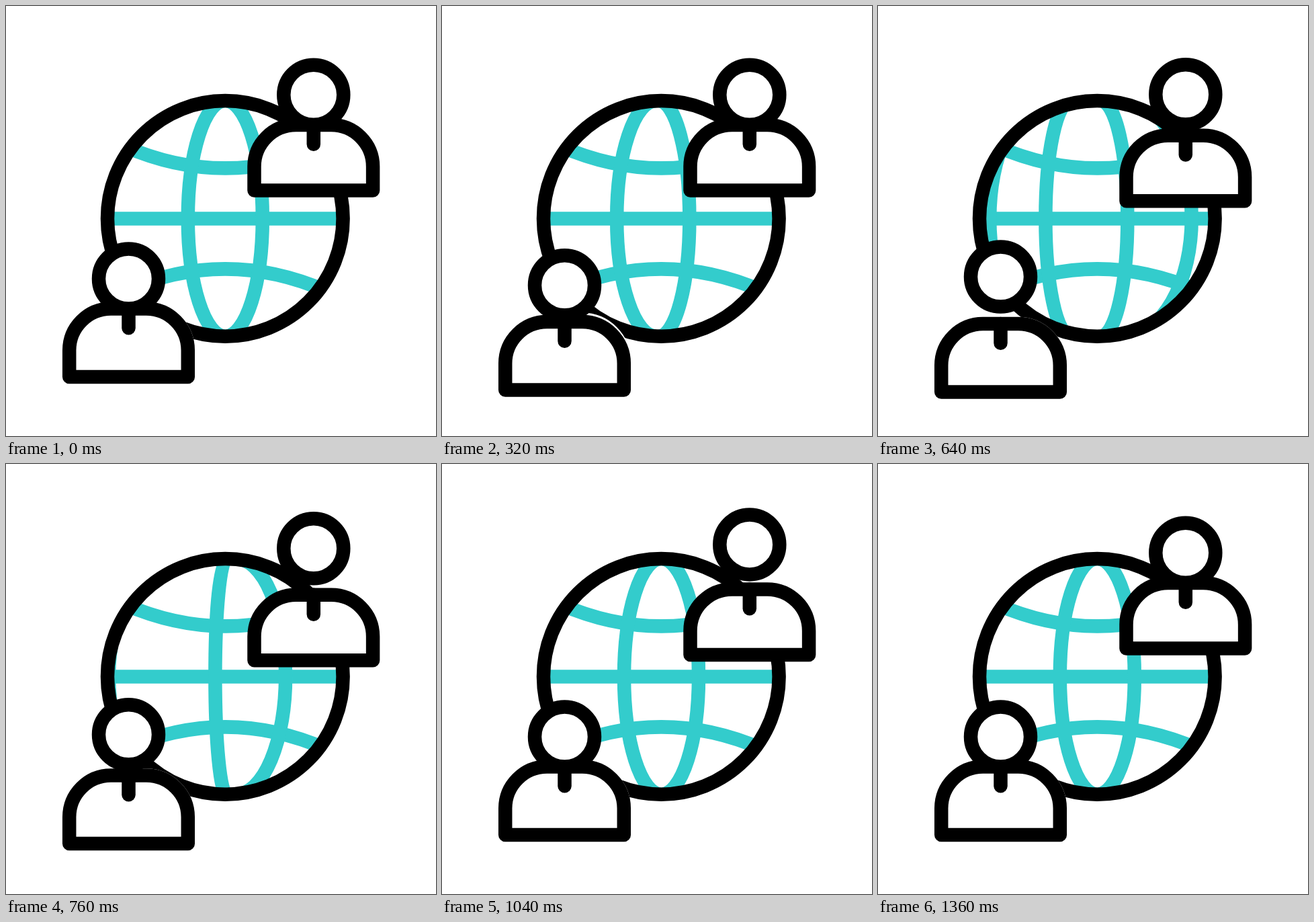
Animation, 640 px wide and 640 px high, one loop 1400 ms. Source, as an HTML page with a canvas:

```html
<!DOCTYPE html>
<html lang="en">
<head>
<meta charset="utf-8">
<title>Connected people</title>
<style>
  html, body { margin: 0; width: 100%; height: 100%; overflow: hidden; background: #fff; }
  canvas { display: block; width: 640px; height: 640px; }
</style>
</head>
<body>
<canvas id="stage" width="640" height="640"></canvas>
<script>
const ctx = document.getElementById('stage').getContext('2d');
const LOOP = 1400, STEP = 40;
const TEAL = '#33cccc', LINE = 20.5;
const globe = { x: 326.3, y: 316.4, r: 175.3 };

// Each key is [time, offset]; offsets ease along a half cosine.
const lower = {
  x: 182.5, headY: 406, top: 450.5, bottom: 552, lag: 35,
  head: [[40, 0], [290, 10], [620, -3], [790, -3.2], [1040, 0]],
  body: [[40, 0], [460, 26], [530, 26], [990, 0]]
};
const upper = {
  x: 457.8, headY: 132.2, top: 177, bottom: 274.5, lag: 0,
  head: [[360, 0], [520, 2], [970, -13.3], [1370, 0]],
  body: [[380, 0], [720, 18], [1380, 0]]
};

function track(keys, t) {
  if (t <= keys[0][0]) return keys[0][1];
  for (let i = 1; i < keys.length; i++) {
    const [t0, a] = keys[i - 1], [t1, b] = keys[i];
    if (t < t1) return a + (b - a) * (1 - Math.cos(Math.PI * (t - t0) / (t1 - t0))) / 2;
  }
  return keys[keys.length - 1][1];
}

function easeInOut(x) {
  x = Math.min(1, Math.max(0, x));
  return x < 0.5 ? 4 * x ** 3 : 1 - 4 * (1 - x) ** 3;
}

function circle(x, y, r) {
  ctx.beginPath();
  ctx.arc(x, y, r, 0, Math.PI * 2);
}

function line(x0, y0, x1, y1) {
  ctx.beginPath();
  ctx.moveTo(x0, y0);
  ctx.lineTo(x1, y1);
  ctx.stroke();
}

// Half ellipse crossing the equator at mid, bulging by width from its poles.
function meridian(mid, width) {
  const from = width < 0 ? Math.PI / 2 : -Math.PI / 2;
  ctx.beginPath();
  ctx.ellipse(mid - width, 0, Math.abs(width), globe.r, 0, from, from + Math.PI);
  ctx.stroke();
}

function parallel(side) {
  ctx.beginPath();
  ctx.moveTo(-150, side * 107.6);
  ctx.quadraticCurveTo(0, side * 42.4, 150, side * 107.6);
  ctx.stroke();
}

function drawGlobe(t) {
  ctx.save();
  ctx.translate(globe.x, globe.y);
  ctx.save();
  circle(0, 0, globe.r);
  ctx.clip();
  ctx.strokeStyle = TEAL;
  ctx.lineCap = 'butt';
  line(-globe.r, 0, globe.r, 0);
  parallel(-1);
  parallel(1);

  const leave = 6.13e-7 * Math.max(0, t - 40) ** 3;
  const arrive = 274 * (1 - easeInOut((t - 80) / 1020));
  if (t < 800) {
    meridian(-55.5 - 0.79 * leave, -55.5 - 0.22 * leave);
    meridian(55.5 - leave, 55.5 - 0.7 * leave);
  }
  if (t > 360) {
    meridian(-55.5 + arrive, -55.5 + 0.95 * arrive);
    meridian(55.5 + 0.845 * arrive, 55.5 + 0.45 * arrive);
  }
  ctx.restore();
  ctx.strokeStyle = '#000';
  circle(0, 0, globe.r);
  ctx.stroke();
  ctx.restore();
}

function bodyPath(p, dy) {
  const half = 88.3, r = 62, left = p.x - half, right = p.x + half;
  const top = p.top + dy, bottom = p.bottom + dy;
  ctx.beginPath();
  ctx.moveTo(left, bottom);
  ctx.lineTo(left, top + r);
  ctx.arcTo(left, top, left + r, top, r);
  ctx.lineTo(right - r, top);
  ctx.arcTo(right, top, right, top + r, r);
  ctx.lineTo(right, bottom);
  ctx.closePath();
}

function drawPerson(p, t) {
  const dy = track(p.body, t);
  ctx.fillStyle = '#fff';
  ctx.lineCap = ctx.lineJoin = 'round';

  // The white backing trails slightly behind the outline.
  if (p.lag) {
    ctx.strokeStyle = '#fff';
    bodyPath(p, Math.min(dy, track(p.body, t - p.lag)));
    ctx.stroke();
  }
  ctx.strokeStyle = '#000';
  bodyPath(p, dy);
  ctx.fill();
  ctx.stroke();
  line(p.x, p.top + dy, p.x, p.top + dy + 28.8);

  circle(p.x, p.headY + track(p.head, t), 44.5);
  ctx.fill();
  ctx.stroke();
}

function draw(t) {
  ctx.fillStyle = '#fff';
  ctx.fillRect(0, 0, 640, 640);
  ctx.lineWidth = LINE;
  drawGlobe(t);
  drawPerson(lower, t);
  drawPerson(upper, t);
}

function tick() {
  const t = performance.now() % LOOP;
  draw(Math.floor(t / STEP) * STEP);
  requestAnimationFrame(tick);
}
tick();
</script>
</body>
</html>
```
